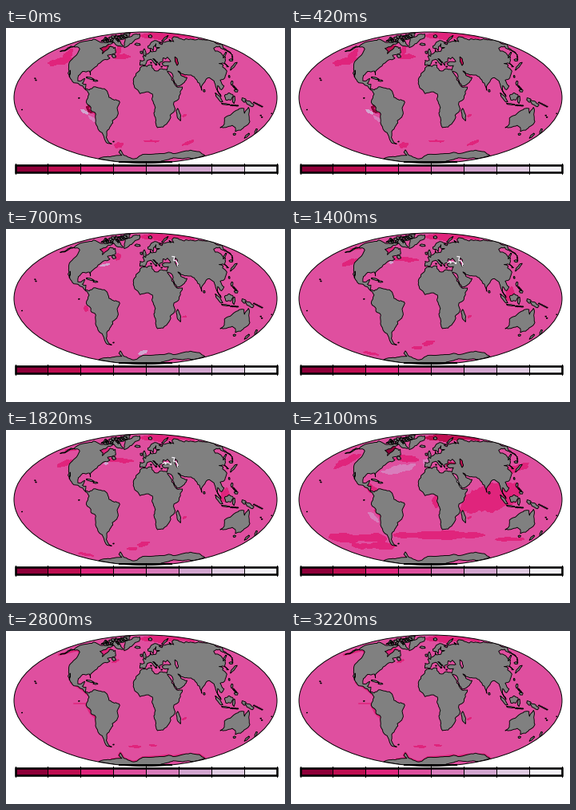
Recreate the animation shown at these times as a matplotlib script. Size 349x217 px, loop 3500 ms.

```python
import numpy as np
import matplotlib.pyplot as plt
from matplotlib.animation import FuncAnimation
from matplotlib.patches import Ellipse, Polygon, Rectangle

W, H, DPI = 349, 217, 64
PX = 72 / DPI
CX, CY, RX, RY = 174.5, 87.3, 164.5, 82.3
RAMP = ["#8f0039", "#bf0e51", "#e0247c", "#df4f9f",
        "#d97dbc", "#d3a6d0", "#e1cce3", "#f4f1f7"]
WINE, RED, ROSE, PINK, ORCHID, LILAC, PALE, WHITE = RAMP
LAND = "#808080"
STEPS, STEP_MS = 5, 700

rng = np.random.default_rng(4)
T = np.linspace(-np.pi / 2, np.pi / 2, 2001)
LAT = np.degrees(np.arcsin(np.clip((2 * T + np.sin(2 * T)) / np.pi, -1, 1)))

fig = plt.figure(figsize=(W / DPI, H / DPI), dpi=DPI, facecolor="white")
ax = fig.add_axes([0, 0, 1, 1])
ax.set(xlim=(0, W), ylim=(H, 0))
ax.axis("off")
globe = Ellipse((CX, CY), 2 * RX, 2 * RY, fc=PINK, ec="none", zorder=0)
ax.add_patch(globe)


def mollweide(lon, lat):
    t = np.interp(lat, LAT, T)
    return np.stack([CX + RX * np.asarray(lon) / 180 * np.cos(t), CY - RY * np.sin(t)], -1)


def fractal(a, b, rough):
    """Midpoint displacement from a up to, but not including, b."""
    d = b - a
    if np.hypot(*d) < 3:
        return [a]
    mid = (a + b) / 2 + np.clip(rng.normal(0, rough), -.25, .25) * np.array([-d[1], d[0]])
    return fractal(a, mid, rough) + fractal(mid, b, rough)


def ragged(xy, rough):
    return np.array([p for a, b in zip(xy, np.roll(xy, -1, axis=0))
                     for p in fractal(a, b, rough)])


def oval(x, y, a, b, tilt, wobble):
    """Irregular ellipse; a positive tilt rises to the right."""
    t = np.linspace(0, 2 * np.pi, 24, endpoint=False)
    r = 1 + wobble * (np.sin(2 * t + rng.uniform(0, 6)) + np.sin(5 * t + rng.uniform(0, 6)))
    u, v, k = a * r * np.cos(t), b * r * np.sin(t), np.radians(tilt)
    return np.c_[x + u * np.cos(k) + v * np.sin(k), y - u * np.sin(k) + v * np.cos(k)]


def shape(xy, fill, edge="none", z=1):
    p = Polygon(xy, closed=True, fc=fill, ec=edge, lw=.9 * PX, zorder=z,
                antialiased=edge != "none", joinstyle="round")
    ax.add_patch(p)
    p.set_clip_path(globe)
    return p


def land(pts, rough=.09):
    shape(ragged(mollweide(*np.array(pts).T), rough), LAND, "black", 3)


def island(lon, lat, a, b, tilt=0, fill=LAND, z=3):
    return shape(oval(*mollweide(lon, lat), a, b, tilt, .14), fill, "black", z)


def chain(lon0, lat0, lon1, lat1, count, size=.7):
    for k in np.linspace(0, 1, count):
        island(lon0 + k * (lon1 - lon0), lat0 + k * (lat1 - lat0), size, size * .7)


AFRICA = [
    (32.6, 29.9), (37.2, 20), (43.2, 12), (51.2, 11.8), (48, 4.5), (39, -5), (40.5, -15),
    (35, -19.8), (35.5, -24), (32.5, -28.5), (27, -33.5), (18.4, -34.2), (14.4, -22.5),
    (11.8, -17), (13.7, -11), (8.9, -1), (9.6, 3.8), (4, 6.4), (-7.6, 4.4), (-15, 11),
    (-17.2, 16), (-16, 23), (-9.7, 30), (-5.9, 35.8), (10, 37.3), (10.2, 34), (19, 30.3),
    (22, 32.5), (32.3, 31.2)]
EUROPE = [
    (36, 36.5), (27.5, 37), (26.3, 39.3), (31, 41.4), (41.5, 41.6), (38, 47), (33.7, 44.6),
    (30.5, 46.2), (28.3, 41.5), (23, 40.4), (22.8, 36.5), (19.4, 41), (12.5, 45.2),
    (18.4, 40.2), (16, 38), (9, 44.3), (3.2, 43), (-2, 36.8), (-8.9, 37), (-9, 43),
    (-1.7, 43.4), (-4.7, 48.3), (1.6, 50.8), (8.5, 53.8), (9.5, 57.6), (10.5, 54.3),
    (20, 54.8), (23.5, 59), (29.8, 59.9), (21.4, 61), (25, 65.6), (17.3, 61.5), (15, 55.5),
    (11, 59), (5.3, 59.5), (5, 62), (14.5, 68), (26, 71), (41, 67), (33, 66.7), (38, 64.3),
    (44, 68), (67, 69), (69, 72.5), (74, 69), (81, 73.7), (104, 77.7), (110, 73.7),
    (140, 72.5), (180, 69)]
ASIA = [
    (180, 65), (163, 59.5), (157, 51), (157, 58), (163, 62), (142, 59.2), (135.2, 54.8),
    (141, 53), (139, 47), (127.5, 39.7), (129, 35.2), (126, 35), (124.7, 39.7),
    (118, 39), (122.5, 37.2), (119.3, 35), (121.8, 30), (114, 22.3), (106, 19.5),
    (109.2, 13), (104.8, 8.7), (100.5, 13.4), (99.3, 10), (103.5, 1.4), (98.2, 9),
    (97, 16.5), (91.8, 22.4), (87, 21), (80.2, 15), (77.5, 8.1), (72.8, 20), (66.5, 25.4),
    (57.5, 25.6), (48.5, 30.2), (51.5, 25), (59.8, 22.5), (55, 17.2), (44, 12.8), (39, 21.5),
    (34.9, 29.5)]
NORTH_AMERICA = [
    (-166, 68), (-156, 71), (-128, 70), (-96, 68), (-82, 69), (-87, 65), (-94.5, 59),
    (-82.3, 55), (-79.5, 51.5), (-77, 56.5), (-77.5, 62), (-70, 61), (-66, 58.8),
    (-64.5, 60.3), (-55.7, 52.3), (-68, 49.5), (-61, 45.8), (-70, 43.5), (-75.8, 36),
    (-81.3, 31), (-80.3, 25.5), (-83.8, 30), (-94, 29.6), (-97.5, 25), (-95.8, 18.8),
    (-91, 18.8), (-87, 21.5), (-88.5, 16), (-83.3, 15), (-83, 10), (-77.4, 8.5)]
SOUTH_AMERICA = [
    (-72, 12), (-62, 10.6), (-51.5, 4.5), (-50, .3), (-35.3, -5.2), (-39, -14), (-41.2, -22),
    (-48.6, -26), (-57, -36), (-62.2, -39), (-67.4, -46), (-68.4, -52.5), (-65.2, -54.7),
    (-73.5, -52.5), (-73.5, -38), (-70.3, -18.4), (-76.2, -14), (-81.3, -5), (-77.3, 4)]
PACIFIC_COAST = [
    (-80, 7.5), (-87.5, 13), (-95, 16.1), (-105.5, 20.2), (-113.5, 31), (-109.6, 23),
    (-117, 32.5), (-124, 41), (-124, 48), (-134, 58), (-147, 61), (-164.5, 54.6),
    (-158, 58.5), (-161, 64.3)]
AUSTRALIA = [
    (142.5, -10.8), (146.3, -18.9), (153.4, -27), (150, -37.3), (143.5, -38.8), (138, -34),
    (131, -31.5), (123.5, -34), (115, -34.2), (113.7, -23), (122, -18), (131, -12.2),
    (136.8, -12.2), (139.5, -17.6)]
ANTARCTICA = [
    (-180, -78.5), (-150, -76), (-102, -73.5), (-68, -72), (-66, -67), (-57, -63.3),
    (-62, -72), (-50, -78), (-30, -77), (-8, -70.5), (38, -69), (57, -67), (72, -69),
    (88, -66.3), (130, -66), (171, -72), (165, -77.5), (180, -78.5), (180, -89), (-180, -89)]

land(AFRICA + EUROPE + ASIA)
land(NORTH_AMERICA + SOUTH_AMERICA + PACIFIC_COAST)
land(AUSTRALIA)
land(ANTARCTICA, .04)
land([(-45, 60), (-54, 69), (-70, 76.2), (-60, 82), (-32, 83.5), (-20, 75), (-37, 65.7)])

for place in [
    (-73, 68, 8, 3, -30), (-80, 79, 7, 2.5, 25), (-110, 71, 4, 2.5, 0), (-56, 48.5, 2.5, 2, 0),
    (-18.5, 64.8, 3, 1.5, 0), (-1.8, 53, 1.8, 4, 12), (-7.8, 53.3, 1.3, 1.7, 0),
    (18, 78.5, 2.5, 1.5, 0), (60, 74, 5, 1.1, 40), (-79.5, 21.7, 5, 1, -18),
    (-71, 19, 2.6, 1, 0), (46.8, -19, 2.2, 7, 18), (80.8, 7.6, 1, 1.6, 0)]:
    island(*place)
for place in [
    (100.5, -.3, 7, 1.6, -49), (110, -7.3, 4.5, .8, -8), (114, 1, 4.5, 4.8, 0),
    (121, -2.3, 1.6, 4, 0), (135, -2.8, 3.4, 2, -25), (143, -6.5, 5.5, 2.4, -28),
    (121.3, 16.3, 1.2, 2.8, 0), (124.7, 7.7, 2, 1.8, 0), (121, 23.7, .8, 1.5, 0),
    (137.5, 36, 5.4, 1.4, 50), (142.8, 43.4, 2, 1.5, 0), (143, 50, .9, 4, -25),
    (146.7, -42.2, 1.4, 1.3, 0), (176, -38.5, 1.2, 3, -25), (170.5, -44, 1.1, 4, -42)]:
    island(*place)
for lon, lat in zip(rng.uniform(-125, -72, 34), rng.uniform(69, 80, 34)):
    island(lon, lat, rng.uniform(.8, 2.6), rng.uniform(.6, 1.4), rng.uniform(-40, 40))
chain(118, -8.5, 127, -9, 5, .9)
chain(149, -5.5, 161, -10, 6, .8)
chain(164, -20, 167, -22, 2)
chain(122, 13, 125, 9.5, 4, .9)
chain(146, 44, 156, 50, 5, .5)
chain(-158, 21.5, -155.5, 19.5, 2)
chain(-172, -13.5, 178, -17.8, 2, .5)
chain(-91, -.5, -59, -51.7, 2)
chain(25, 35.2, 9, 40, 3, .8)

caspian = island(51, 42, 1.8, 4.6, 15, fill=PINK, z=4)
CASPIAN_FILL = [RED, PINK, PINK, RED, PINK]

groups = [[] for _ in range(STEPS)]


def blob(step, color, x, y, a, b, tilt=0):
    groups[step].append(shape(ragged(oval(x, y, a, b, tilt, .15), .1), color))


def band(step, color, lon0, lon1, lat, half, z=1):
    """Wavy strip along a parallel, tapered at both ends."""
    lon = np.linspace(lon0, lon1, 40)
    k = np.linspace(0, 1, 40)
    wave = 1 + .3 * np.sin(9 * k + lat) + .15 * np.sin(23 * k)
    spread = half * wave * np.minimum(1, 8 * k * (1 - k) + .2)
    xy = np.r_[mollweide(lon, lat + spread), mollweide(lon, lat - spread)[::-1]]
    groups[step].append(shape(xy, color, z=z))


def coast(step, color, pts, width=2.5, z=2):
    xy = mollweide(*np.array(pts).T)
    line, = ax.plot(*xy.T, color=color, lw=width * PX, zorder=z)
    line.set_clip_path(globe)
    groups[step].append(line)


def squiggle(step, x, y, w, h):
    """White ragged shoreline across an inland sea."""
    k = np.linspace(0, 1, 12)
    line, = ax.plot(x + w * (k - .5) + 1.5 * np.sin(11 * k), y + h * (k - .5) + np.cos(17 * k),
                    color=WHITE, lw=1.3 * PX, zorder=5)
    groups[step].append(line)


for s, (hudson, arctic) in enumerate(zip([RED, ROSE, ROSE, WINE, ROSE],
                                         [ROSE, ROSE, ROSE, RED, ROSE])):
    blob(s, hudson, 126, 26, 7, 4)
    band(s, arctic, -20, 175, 80, 5)
    blob(s, ROSE, 223, 110, 2.2, .8, 20)

# warm north, dark Peruvian coast
blob(0, ROSE, 67, 42, 13, 4, 15)
blob(0, ROSE, 76, 36, 10, 4, 45)
blob(0, ROSE, 145, 36, 8, 3)
blob(0, ROSE, 141, 28, 3, 5)
blob(0, WINE, 105, 102, 6, 2.5, -45)
blob(0, LILAC, 98, 105, 5, 1.2, -35)
blob(0, ORCHID, 108, 114, 5, 1.8, -35)
coast(0, ROSE, [(-77, -12), (-70.8, -19), (-72, -32)])
blob(0, ROSE, 141, 147, 5, 3)
blob(0, ROSE, 182, 142, 8, 1)
blob(0, ROSE, 228, 144, 7, 1.6, 20)
blob(0, ROSE, 222, 60, 4, 1.5, -30)

# nearly neutral
blob(1, ROSE, 140, 35, 3, 4)
blob(1, LILAC, 124, 45, 5, 1, 15)
blob(1, ROSE, 100, 100, 2.5, 3)
blob(1, LILAC, 171, 155, 6, 1.5, 20)
blob(1, LILAC, 207, 158, 2, 1)
squiggle(1, 212, 40, 8, 13)

# streaks across both northern oceans
blob(2, ROSE, 73, 42, 10, 2.5, 27)
blob(2, ROSE, 142, 38, 14, 2.4, -3)
blob(2, LILAC, 125, 42, 2, 1)
blob(2, ROSE, 274, 82, 5, 8)
blob(2, ROSE, 100, 156, 8, 1.3, -10)
blob(2, ROSE, 158, 149, 5, 2)
blob(2, ROSE, 172, 143, 7, 2.5, 10)
coast(2, ROSE, [(-165, 59), (-148, 60)])
squiggle(2, 202, 42, 12, 2)
squiggle(2, 212, 40, 8, 13)

# broad belts
band(3, ROSE, -170, -75, -44.5, 4.5)
band(3, ROSE, -150, -70, -55, 3.5)
band(3, ROSE, -60, 88, -41, 4)
band(3, ROSE, 112, 160, -46, 1.8)
blob(3, ROSE, 250, 83, 35, 16)
blob(3, ROSE, 228, 95, 18, 7, 15)
blob(3, ROSE, 277, 76, 8, 11)
blob(3, PINK, 229, 70, 10, 5, 20)
blob(3, ROSE, 280, 49, 17, 4, 15)
blob(3, ROSE, 70, 39, 16, 4, 30)
blob(3, ROSE, 145, 36, 13, 4)
blob(3, ORCHID, 135, 49, 19, 4.5, 10)
blob(3, ROSE, 183, 88, 5, 9)
blob(3, ROSE, 101, 74, 10, 4, -25)
blob(3, ORCHID, 103, 109, 9, 2, -42)
blob(3, ORCHID, 170, 41, 4, 5)
blob(3, RED, 200, 44, 6, 3)
coast(3, WHITE, [(34.5, 27), (38, 20.5), (42, 14.5)], 1.6)
coast(3, ROSE, [(-77, -12), (-71, -19), (-72, -32)])

# thin coastal rims
coast(4, ROSE, [(-106, 20), (-95, 15.5), (-86, 11), (-80, 7)])
coast(4, ROSE, [(-98, -3), (-81, -3)], 1.5)
coast(4, ROSE, [(-81, -5), (-76.5, -14), (-70.8, -19), (-72, -32)], 3)
coast(4, ROSE, [(-165, 54), (-147, 60.5), (-135, 58)])
coast(4, ROSE, [(-54, 69), (-45, 60), (-37, 65.5)], 2)
coast(4, ROSE, ANTARCTICA[2:16], 3)
blob(4, ROSE, 161, 145, 8, 1)
blob(4, ROSE, 184, 143.5, 4, .8)
blob(4, ROSE, 137, 38, 4, 1, 20)

# globe rim, darker along the polar coast
ax.add_patch(Ellipse((CX, CY), 2 * RX, 2 * RY, fc="none", ec="black", lw=PX, zorder=6))
ax.plot([142, 207], [CY + RY - 1.5] * 2, color="black", lw=2 * PX, zorder=6)

# colour scale
X0, X1, Y0, Y1 = 11.5, 338.5, 172, 181.5
cell = (X1 - X0) / len(RAMP)
for i, c in enumerate(RAMP):
    ax.add_patch(Rectangle((X0 + i * cell, Y0), cell, Y1 - Y0, fc=c, ec="none", zorder=7))
for x in np.linspace(X0, X1, len(RAMP) + 1):
    ax.plot([x, x], [Y0 - 2, Y1 + 1.5], color="black", lw=PX, zorder=8)
ax.add_patch(Rectangle((X0, Y0 - .5), X1 - X0, Y1 - Y0, fc="none", ec="black",
                       lw=2.6 * PX, zorder=8))


def update(step):
    for i, group in enumerate(groups):
        for artist in group:
            artist.set_visible(i == step)
    caspian.set_facecolor(CASPIAN_FILL[step])
    return []


anim = FuncAnimation(fig, update, frames=STEPS, interval=STEP_MS, repeat=True,
                     repeat_delay=0, init_func=lambda: update(0))
plt.show()
```
